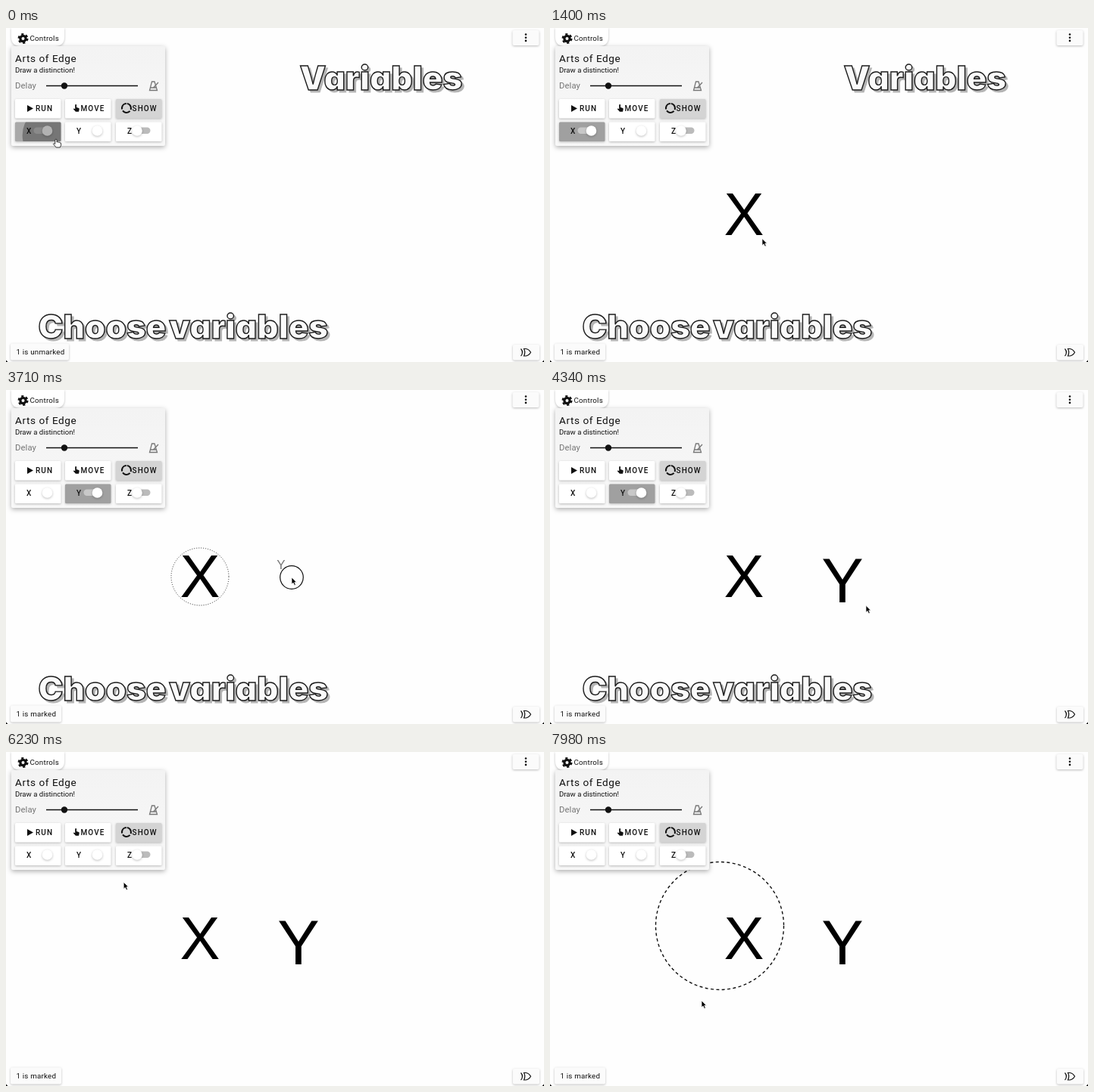
Animation, 710 px wide and 442 px high, one loop 8000 ms. Source, as an HTML page:

```html
<!DOCTYPE html>
<html lang="en">
<head>
<meta charset="utf-8">
<title>Variables</title>
<style>
html, body { margin: 0; width: 100%; height: 100%; overflow: hidden; background: #fefefe; }
svg { display: block; width: 710px; height: 442px; }
text { font-family: Roboto, sans-serif; fill: #111; white-space: pre; }
.label { font-size: 10px; font-weight: 500; letter-spacing: 1.1px; }
.small { font-size: 9.8px; letter-spacing: .2px; }
.glyph { font-family: "Liberation Sans", Arial, sans-serif; text-anchor: middle; fill: #000; }
.caption text { font: 900 44px Inter, sans-serif; font-feature-settings: "cv11"; word-spacing: -5px; }
.caption .shade { fill: #b4b4b4; stroke: #b4b4b4; stroke-width: 1; }
.caption .face { fill: #fafafa; stroke: #1c1c1c; stroke-width: 1.4; }
.raised { filter: drop-shadow(0 1.5px 1.5px rgba(0,0,0,.26)); }
.panel { filter: drop-shadow(0 2px 3px rgba(0,0,0,.32)); }
.line { fill: none; stroke: #111; }
</style>
</head>
<body>
<svg viewBox="0 0 710 442">
  <defs>
    <linearGradient id="sheet" x2="0" y2="1"><stop stop-color="#f3f3f3"/><stop offset="1" stop-color="#f8f8f8"/></linearGradient>
  </defs>
  <rect width="710" height="442" fill="#fefefe"/>
  <g id="drawing">
    <circle id="ring" class="line" stroke-width="1.4"/>
    <circle id="haloX" class="line" cx="256" cy="247" r="38" stroke-width=".9" stroke-dasharray="1 2"/>
    <circle id="haloY" class="line" cx="386" cy="253.5" r="40.3" stroke-width=".9" stroke-dasharray="1 2"/>
    <text id="glyphX" class="glyph">X</text>
    <text id="glyphY" class="glyph">Y</text>
  </g>

  <path class="raised" fill="#fff" d="M7 0H77V12Q77 24 65 24H19Q7 24 7 12Z"/>
  <g transform="translate(22.5 14)">
    <circle r="3.6" fill="none" stroke="#111" stroke-width="3.2"/>
    <circle r="5.8" fill="none" stroke="#111" stroke-width="2.4" stroke-dasharray="3.04 3.04"/>
  </g>
  <text class="small" x="31.5" y="17.3">Controls</text>

  <rect class="panel" x="7" y="24" width="203" height="132" rx="2" fill="url(#sheet)"/>
  <text x="12" y="45" font-size="13.6" letter-spacing=".55">Arts of Edge</text>
  <text x="12" y="59.3" font-size="9.6">Draw a distinction!</text>
  <text x="12" y="80.3" font-size="11.3" letter-spacing=".1" style="fill:#777">Delay</text>
  <path class="line" d="M53 76.5H174" stroke-width="1.3"/>
  <circle cx="77" cy="76.5" r="4.2" fill="#111"/>
  <path fill="none" stroke="#777" stroke-width="1.3" d="M192.5 71H196L199.5 82.5H189.5ZM190.5 79H198.5M194.5 79L201 72"/>
  <g id="buttons"></g>
  <path d="M28 102V111L36 106.5Z" fill="#111"/>
  <path transform="translate(13 16) scale(.85)" d="M92 100.5q1.3-1 2.2 0v4.3l3.5 1q1 .4.8 1.7l-.8 3.9h-4.8l-3.7-4 .9-.9 1.9.8Z" fill="#111"/>
  <circle class="line" cx="159" cy="106" r="6" stroke-width="2.1" stroke-dasharray="10.6 1.966" transform="rotate(-82 159 106)"/>

  <g class="raised" fill="#fbfbfb">
    <rect x="668.5" y="3" width="35" height="20" rx="2"/>
    <rect x="669" y="419" width="35" height="20.5" rx="2"/>
    <rect id="statusBox" x="6" y="417.5" height="22" rx="2"/>
  </g>
  <g fill="#111"><circle cx="686" cy="8.5" r="1.3"/><circle cx="686" cy="12.7" r="1.3"/><circle cx="686" cy="16.9" r="1.3"/></g>
  <path class="line" stroke-width="1.2" d="M679.5 424.5Q683.5 429.3 679.5 434M683.5 424.5H686Q690 425 692.5 429.3Q690 433.6 686 434H683.5Q686 429.3 683.5 424.5Z"/>
  <text id="status" class="small" x="13.4" y="431.7"></text>

  <g id="heading" class="caption"></g>
  <g id="caption" class="caption"></g>
  <path d="M0 439.5V442H2.5ZM710 439.5V442H707.5Z" fill="#111"/>

  <circle id="touch" class="line" r="15.3" stroke-width="1.2"/>
  <path id="arrow" d="M0 0V9L2.1 7.1L3.6 10.4L5.3 9.7L3.8 6.4H6.4Z" fill="#000" stroke="#fff" stroke-width=".7"/>
  <path id="hand" d="M-1.2 .8Q0-.6 1.1.8V4Q2.4 3.2 3.1 4.3Q4.4 3.7 5 4.8Q6.6 4.5 6.6 6.2V8.3L5.3 11H.2L-3.6 6.5Q-3.6 4.8-1.2 6.4Z" fill="#fff" stroke="#222" stroke-width=".9"/>
</svg>
<script>
const LOOP = 8000, STEP = 70;
const $ = id => document.getElementById(id);
const set = (el, attrs) => { for (const k in attrs) el.setAttribute(k, attrs[k]); };
const clamp = v => Math.max(0, Math.min(1, v));
const mix = (a, b, u) => a + (b - a) * u;
const show = (id, on) => $(id).style.opacity = +on;

// time, pointer x, pointer y
const path = [
  [0, 66, 147], [350, 66, 147], [800, 229, 220], [1200, 283, 274], [1400, 280, 278.7],
  [1750, 280, 278.7], [2300, 136, 144], [2500, 136, 144], [2800, 66, 145], [3000, 66, 145],
  [3560, 357.5, 225.5], [3710, 377, 248], [4200, 414.5, 281.5], [4500, 420, 290],
  [4850, 420, 290], [5320, 157, 167], [5550, 128, 145], [5800, 128, 145],
  [6350, 159, 176], [7000, 277, 270], [7300, 289, 284], [7450, 289, 284], [7910, 200, 329]
];
const drags = { x: [800, 1200], y: [3560, 4200], ring: [6350, 7300] };
const clicks = [
  { key: "X", t: -200, on: true }, { key: "Y", t: 2330, on: true },
  { key: "X", t: 2900, on: false }, { key: "Y", t: 5650, on: false }
];

function pointer(t) {
  const i = path.findIndex(p => p[0] > t);
  if (i < 0) return path.at(-1).slice(1);
  const a = path[i - 1], b = path[i];
  const u = (t - a[0]) / (b[0] - a[0]), e = u * u * (3 - 2 * u);
  return [mix(a[1], b[1], e), mix(a[2], b[2], e)];
}

// The drawn circle has the drag as its diameter and trails the pointer slightly.
function dragCircle([start, end], t) {
  const [x0, y0] = pointer(start);
  const [x1, y1] = pointer(Math.max(start, t >= end ? end : t - STEP));
  return { cx: (x0 + x1) / 2, cy: (y0 + y1) / 2, r: Math.hypot(x1 - x0, y1 - y0) / 2 };
}
const dragging = ([a, b], t) => t >= a && t < b;

function button(x, y, text, textX, fill) {
  return `<rect class="raised" x="${x}" y="${y}" width="60.5" height="25.5" rx="1.5" fill="${fill}"/>
    <text class="label" x="${textX}" y="${y + 15.8}">${text}</text>`;
}

function toggle(key, x) {
  return `<clipPath id="clip${key}"><rect x="${x}" y="124.5" width="60.5" height="25.5" rx="1.5"/></clipPath>
    <rect id="base${key}" class="raised" x="${x}" y="124.5" width="60.5" height="25.5" rx="1.5" fill="#fff"/>
    <text class="label" x="${x + 15}" y="140.3">${key}</text>
    <rect id="track${key}" x="${x + 24.5}" y="131.5" width="21" height="8.5" rx="4.2" fill="#bbb"/>
    <circle class="raised" cx="${key === "Z" ? x + 28 : x + 42.5}" cy="136" r="6.8" fill="#fff"/>
    <g clip-path="url(#clip${key})"><circle id="ripple${key}" r="0"/></g>`;
}

function outlined(id, text, x, y) {
  $(id).innerHTML = `<text class="shade" x="${x + 3}" y="${y + 3}">${text}</text>
    <text class="face" x="${x}" y="${y}">${text}</text>`;
}

$("buttons").innerHTML =
  button(12, 94, "RUN", 39, "#fff") + button(78, 94, "MOVE", 98.5, "#fff") + button(145, 94, "SHOW", 166.5, "#d4d4d4") +
  toggle("X", 12) + toggle("Y", 78) + toggle("Z", 145);
outlined("heading", "Variables", 387.5, 81.5);
outlined("caption", "Choose variables", 42.5, 411);

function drawToggle(key, t) {
  const click = clicks.filter(c => c.key === key && c.t <= t).at(-1);
  const age = click ? t - click.t : 0;
  const fade = click ? clamp(age / 220) : 0;
  const level = click ? (click.on ? fade : 1 - fade) : 0;
  const grey = Math.round(mix(255, 160, level));
  set($("base" + key), { fill: `rgb(${grey},${grey},${grey})` });
  set($("track" + key), { fill: "#c8c8c8", opacity: level });
  if (!click) return;
  const [x, y] = pointer(Math.max(0, click.t));
  set($("ripple" + key), {
    cx: x - 6, cy: y - 5, r: mix(6, 74, clamp(age / 420)),
    opacity: .3 * (1 - clamp((age - 260) / 300))
  });
}

function drawGlyph(id, drag, t) {
  const c = dragCircle(drag, t), size = c.r * 2.08;
  set($(id), {
    x: c.cx, y: c.cy + size * .335, "font-size": size,
    opacity: t < drag[0] ? 0 : clamp(.25 + c.r / 30)
  });
}

function render(t) {
  const [x, y] = pointer(t);
  const onButton = x > 12 && x < 206 && y > 94 && y < 151;
  const pressed = Object.values(drags).some(d => dragging(d, t));
  const at = { transform: `translate(${x} ${y})` };
  for (const id of ["touch", "arrow", "hand"]) set($(id), at);
  show("touch", pressed);
  show("arrow", !onButton);
  show("hand", onButton);

  drawToggle("X", t);
  drawToggle("Y", t);
  drawGlyph("glyphX", drags.x, t);
  drawGlyph("glyphY", drags.y, t);
  show("haloX", dragging(drags.y, t) || dragging(drags.ring, t));
  show("haloY", dragging(drags.ring, t));
  set($("ring"), { ...dragCircle(drags.ring, t), "stroke-dasharray": t < drags.ring[1] ? "7 3.6" : "4 3.4" });
  show("ring", t >= drags.ring[0]);

  const marked = t >= drags.x[1];
  $("status").textContent = marked ? "1 is marked" : "1 is unmarked";
  set($("statusBox"), { width: marked ? 67 : 77 });
  show("heading", t < 2030);
  show("caption", t < 6230);
}

const begin = performance.now();
function tick() {
  const t = (performance.now() - begin) % LOOP;
  render(Math.floor(t / STEP) * STEP);
  requestAnimationFrame(tick);
}
tick();
</script>
</body>
</html>
```
